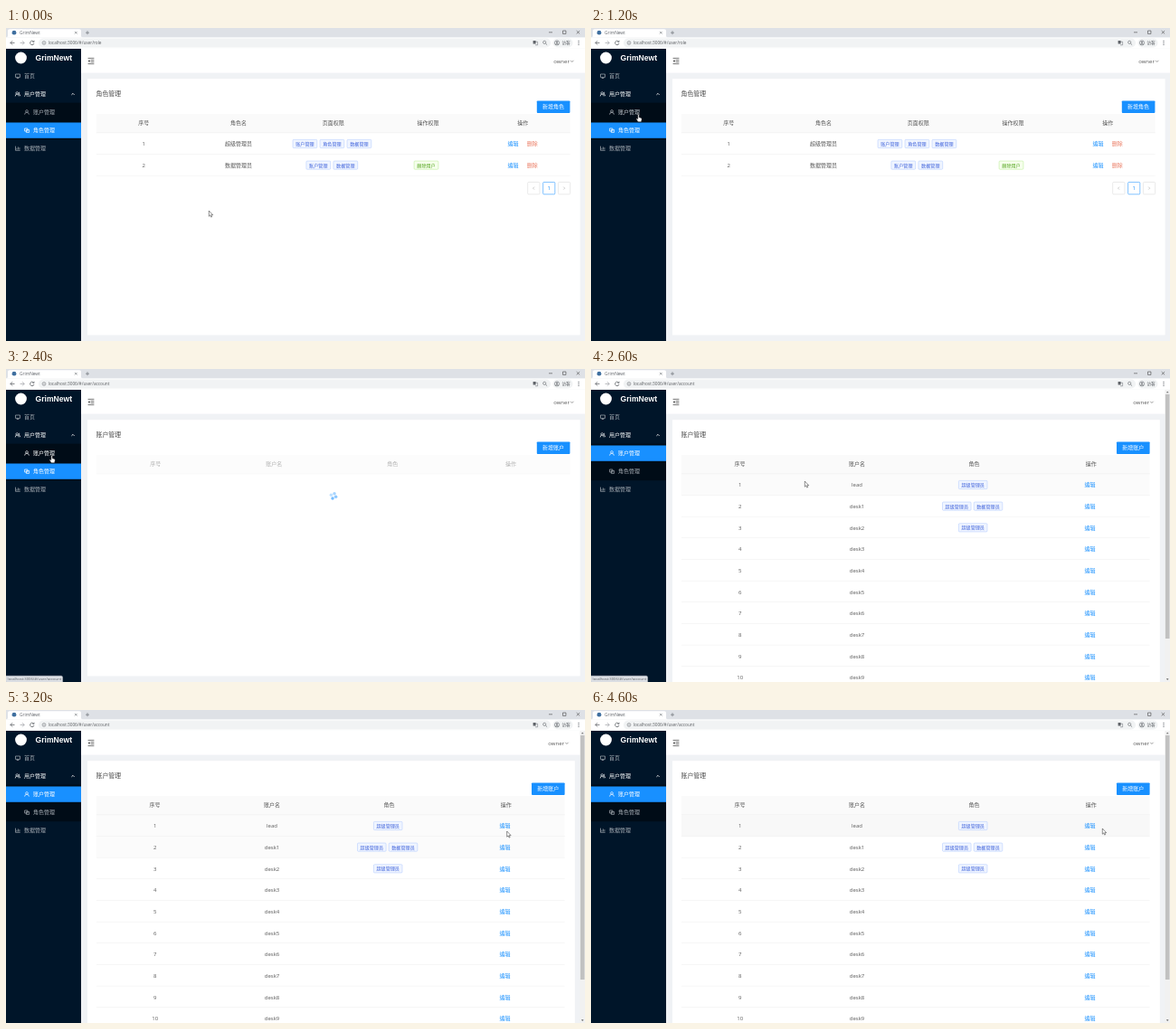
Animation, 640 px wide and 346 px high, one loop 5.6 s. Source, as an HTML page:

```html
<!DOCTYPE html>
<html lang="zh-CN">
<head>
<meta charset="utf-8">
<title>GrimNewt</title>
<style>
html, body { margin: 0; width: 100%; height: 100%; overflow: hidden; background: #fff; }
svg { display: block; width: 100vw; height: 100vh; }
text { font-family: "Open Sans", "Noto Sans CJK SC", "Noto Sans CJK", sans-serif; white-space: pre; }
.brand { font-family: "Liberation Sans", Arial, sans-serif; font-weight: 700; }
</style>
</head>
<body>
<svg id="stage" viewBox="0 0 640 346"></svg>
<script>
const LOOP = 5600, STEP = 100;
const BLUE = '#1890ff', INK = '#595959', DIM = '#a6adb4', CHROME = '#5f6368';
const ROW_TOP = 116, ROW_H = 23.66;

// Markup helpers
const rect = (x, y, w, h, fill, extra = '') =>
  `<rect x="${x}" y="${y}" width="${w}" height="${h}" fill="${fill}" ${extra}/>`;
const path = (d, color, width = 0.8, extra = '') =>
  `<path d="${d}" fill="none" stroke="${color}" stroke-width="${width}" ${extra}/>`;
const dot = (x, y, r, fill, extra = '') =>
  `<circle cx="${x}" cy="${y}" r="${r}" fill="${fill}" ${extra}/>`;
const label = (x, y, str, size = 6, fill = INK, extra = '') =>
  `<text x="${x}" y="${y + size * 0.37}" font-size="${size}" fill="${fill}" ${extra}>${str}</text>`;
const mid = (x, y, str, size, fill, extra = '') =>
  label(x, y, str, size, fill, `text-anchor="middle" ${extra}`);
const group = (id, body, extra = '') => `<g id="${id}" ${extra}>${body}</g>`;
const at = (x, y, body) => `<g transform="translate(${x} ${y})">${body}</g>`;

const rowY = i => 128 + i * ROW_H;

function browser() {
  return rect(0, 0, 640, 10.5, '#dee1e6') +
    '<path d="M0 10.5Q2 10.5 2 8.5V3Q2 1.2 4 1.2H81Q83 1.2 83 3V8.5Q83 10.5 85 10.5Z" fill="#fff"/>' +
    dot(9, 5.2, 2.4, '#3f6f9f') +
    label(15, 5.4, 'GrimNewt', 4.8, CHROME) +
    path('M76 3.9l2.6 2.6m0-2.6l-2.6 2.6', CHROME, 0.6) +
    path('M88 5.2h4m-2-2v4', CHROME, 0.6) +
    path('M600 4.8h4M615.5 3h3.4v3.4h-3.4zM630.7 3l3.4 3.4m0-3.4l-3.4 3.4', '#444', 0.6) +
    rect(0, 10.5, 640, 12.3, '#fff') +
    path('M9.5 16.4h-4.6m2.2-2.2l-2.2 2.2 2.2 2.2', CHROME, 0.8) +
    path('M15.6 16.4h4.6m-2.2-2.2l2.2 2.2-2.2 2.2', '#a5a8ac', 0.8) +
    path('M30.4 14.9a2.2 2.2 0 1 0 .6 2M31 13.8v1.6h-1.6', CHROME, 0.8) +
    rect(36, 11.6, 566, 9.8, '#f1f3f4', 'rx="4.9"') +
    dot(42, 16.4, 1.9, 'none', `stroke="${CHROME}" stroke-width=".5"`) +
    path('M42 16v1.5M42 15v.5', CHROME, 0.5) +
    '<text id="url" x="46.8" y="18.2" font-size="4.75" fill="#5a5d61"></text>' +
    rect(582.6, 14, 3, 3.6, CHROME, 'rx=".4"') +
    path('M585.2 15.2h2.4v3.6h-2.6M583.4 15.6h1.4', CHROME, 0.5) +
    dot(595.2, 15.8, 1.6, 'none', `stroke="${CHROME}" stroke-width=".6"`) +
    path('M596.4 17l1.7 1.7', CHROME, 0.7) +
    rect(604.5, 11.6, 22, 9.8, '#f1f3f4', 'rx="4.9"') +
    dot(609, 16.4, 2.6, 'none', `stroke="${CHROME}" stroke-width=".6"`) +
    dot(609, 15.7, 0.9, CHROME) + path('M607.4 18q1.6-1.4 3.2 0', CHROME, 0.7) +
    label(614.5, 16.4, '访客', 4.6, CHROME) +
    [14.4, 16.4, 18.4].map(y => dot(633, y, 0.55, CHROME)).join('');
}

const ICONS = {
  home: 'M-2.5-2h5v3.4h-5zM-1.3 2.5h2.6M0 1.4v1',
  team: 'M-.8-2.3a1.2 1.2 0 1 0 .01 0M-2.7 2.4q0-2.4 1.9-2.4t1.9 2.4M1-2.2a1.1 1.1 0 0 1 0 2.1q1.6.3 1.7 2.3',
  user: 'M0-2.4a1.3 1.3 0 1 0 .01 0M-2.4 2.6q.2-2.4 2.4-2.4t2.4 2.4',
  roles: 'M-2.4-2h3.2v3h-3.2zM-.6-.6h3.2v3h-3.2z',
  chart: 'M-2.5-2.4v4.7h5.2M-1.1 1.4v-1.7M.4 1.4v-3M1.9 1.4v-2.3'
};

function menuItem(id, x, y, icon, str, color = DIM, weight = 400) {
  return group(id, at(x, y, path(ICONS[icon], 'currentColor', 0.7)) +
    label(x + 7, y, str, 6, 'currentColor', `font-weight="${weight}"`), `color="${color}"`);
}

function sidebar() {
  return rect(0, 22.8, 83, 323.2, '#001529') +
    dot(16.5, 33, 6.4, '#fff') +
    label(32.6, 33.2, 'GrimNewt', 8.57, '#fff', 'class="brand"') +
    menuItem('home', 13, 53, 'home', '首页') +
    menuItem('users', 13, 73, 'team', '用户管理', '#fff', 500) +
    path('M72.4 73.9l1.6-1.6 1.6 1.6', '#fff', 0.8) +
    rect(0, 82.6, 83, 40.6, '#000c17') +
    `<rect id="picked" width="83" height="17.3" fill="${BLUE}"/>` +
    menuItem('account', 23, 93, 'user', '账户管理') +
    menuItem('role', 23, 113, 'roles', '角色管理') +
    menuItem('data', 13, 133, 'chart', '数据管理');
}

function header() {
  return rect(83, 22.8, 557, 26.8, '#fff') +
    path('M90.6 33.4h6.8M93.6 35.5h3.8M93.6 37.5h3.8M90.6 39.6h6.8', '#444', 0.75) +
    '<path d="M92.6 34.9v3.2l-2-1.6z" fill="#444"/>' +
    group('who', mid(614, 36.4, 'owner', 6, INK) + path('M624 35.8l1.7 1.7 1.7-1.7', INK, 0.6));
}

function tag(x, y, str, green) {
  const w = str.length > 4 ? 31.6 : 26.8;
  const [bg, edge, ink] = green ? ['#f6ffed', '#b7eb8f', '#52a41a'] : ['#f0f5ff', '#adc6ff', '#3f63dc'];
  return rect(x - w / 2, y - 4.6, w, 9.2, bg, `rx="1" stroke="${edge}" stroke-width=".5"`) +
    mid(x, y, str, 5.1, ink);
}

const title = str => label(99.6, 72, str, 6.86, '#4a4a4a');
const button = (x, str) => rect(x, 80.4, 36.6, 13.5, BLUE, 'rx=".9"') +
  mid(x + 18.3, 87.1, str, 6, '#fff', 'font-weight="500"');

function tableHead(width, names) {
  const col = width / names.length;
  return rect(99.8, 95, width, 21, '#fafafa') + rect(99.8, 115.7, width, 0.45, '#e8e8e8') +
    names.map((n, i) => mid(99.8 + col * (i + 0.5), 105.2, n, 6, '#555')).join('');
}

function rows(id, width, count) {
  let out = '';
  for (let i = 0; i < count; i++) {
    const y = ROW_TOP + i * ROW_H;
    out += rect(99.8, y, width, ROW_H, '#f8f8f8', `id="${id}${i}" opacity="0"`) +
      rect(99.8, y + ROW_H - 0.4, width, 0.45, '#ebebeb');
  }
  return out;
}

function pager() {
  const box = (x, edge) => rect(x, 170.4, 13.2, 13.4, '#fff', `rx="1" stroke="${edge}" stroke-width=".55"`);
  return box(576.7, '#d9d9d9') + box(593.6, BLUE) + box(610.4, '#d9d9d9') +
    path('M584 175.6l-1.5 1.5 1.5 1.5M616.2 175.6l1.5 1.5-1.5 1.5', '#aaa', 0.6) +
    mid(600.2, 177.1, '1', 6, BLUE);
}

function rolePage() {
  const names = ['超级管理员', '数据管理员'];
  let out = rect(90, 56.2, 544.6, 283.2, '#fff') + title('角色管理') + button(586.8, '新增角色') +
    tableHead(523.8, ['序号', '角色名', '页面权限', '操作权限', '操作']) + rows('r', 523.8, 2);
  names.forEach((n, i) => {
    const y = rowY(i);
    out += mid(152.2, y, i + 1) + mid(257, y, n) +
      mid(560.4, y, '编辑', 6, BLUE) + mid(581.8, y, '删除', 6, '#ea7a62');
  });
  ['账户管理', '角色管理', '数据管理'].forEach((n, i) => out += tag(330.4 + i * 30, rowY(0), n));
  ['账户管理', '数据管理'].forEach((n, i) => out += tag(345.3 + i * 30, rowY(1), n));
  return out + tag(464.5, rowY(1), '删除用户', true) + pager();
}

const ACCOUNT_COLS = ['序号', '账户名', '角色', '操作'];

function loadingPage() {
  const dots = [[-2.6, -1], [1, -2.6], [2.6, 1], [-1, 2.6]]
    .map(([x, y], i) => dot(x, y, 1.75, BLUE, `opacity="${0.4 + i * 0.15}"`)).join('');
  return rect(90, 56.2, 544.6, 283.2, '#fff') + title('账户管理') + button(586.8, '新增账户') +
    group('fadedHead', tableHead(523.8, ACCOUNT_COLS)) + group('spinner', dots);
}

function accountPage() {
  let out = rect(90, 56.2, 538.8, 290, '#fff') + title('账户管理') + button(581, '新增账户') +
    tableHead(517.8, ACCOUNT_COLS) + rows('a', 517.8, 10);
  for (let i = 0; i < 10; i++) {
    const y = rowY(i);
    out += mid(164.7, y, i + 1) + mid(294, y, i ? 'desk' + i : 'lead') + mid(551.4, y, '编辑', 6, BLUE);
  }
  return out + tag(422.2, rowY(0), '超级管理员') + tag(404.3, rowY(1), '超级管理员') +
    tag(439, rowY(1), '数据管理员') + tag(422.2, rowY(2), '超级管理员') +
    rect(634.4, 22.8, 5.6, 323.2, '#f1f1f1') + rect(634.9, 28, 4.6, 270, '#c1c1c1') +
    '<path d="M635.8 26.3l1.4-1.6 1.4 1.6zM635.8 342.3l1.4 1.6 1.4-1.6z" fill="#666"/>';
}

const ARROW = '<path d="M0 0V6.2L1.4 4.9 2.4 7.1 3.4 6.6 2.5 4.6H4.4Z" fill="#fff" stroke="#222" stroke-width=".5"/>';
const HAND = '<path d="M-.7.6Q0-.5.7.6V3.4L3 4Q3.9 4.4 3.6 5.8L3 8.4H-.5L-2.4 5.3Q-2.2 4.2-.7 5.2Z" ' +
  'fill="#fff" stroke="#111" stroke-width=".45"/>';

document.getElementById('stage').innerHTML =
  rect(0, 0, 640, 346, '#f0f2f5') + header() +
  group('rolePage', rolePage()) + group('loadingPage', loadingPage()) + group('accountPage', accountPage()) +
  sidebar() + browser() +
  group('status', '<path d="M0 339.2H61Q62.6 339.2 62.6 340.8V346H0Z" fill="#dee1e6" stroke="#c3c6ca" stroke-width=".4"/>' +
    label(1.6, 342.7, 'localhost:3006/#/user/account', 4.2, CHROME)) +
  group('arrow', ARROW) + group('hand', HAND);

const el = id => document.getElementById(id);
const set = (id, name, value) => el(id).setAttribute(name, value);
const show = (id, on) => set(id, 'visibility', on ? 'visible' : 'hidden');

// Pointer waypoints: time, x, y
const TRAIL = [
  [0, 224.3, 202], [100, 221, 196], [200, 204, 176], [300, 170, 151], [400, 130, 130],
  [500, 98, 113], [600, 76, 104], [800, 60, 98], [1200, 52.5, 95.4], [1700, 50.6, 95.4],
  [2400, 50.6, 95.4], [2500, 130, 108], [2600, 236.3, 124], [2800, 410, 146], [2900, 470, 152],
  [3000, 515, 151], [3100, 543, 144], [3200, 553.7, 134], [4600, 565.3, 131]
];

function pointer(t) {
  const i = TRAIL.findIndex(p => p[0] > t);
  if (i < 0) return TRAIL[TRAIL.length - 1].slice(1);
  if (i === 0) return TRAIL[0].slice(1);
  const [t0, x0, y0] = TRAIL[i - 1], [t1, x1, y1] = TRAIL[i];
  const k = (t - t0) / (t1 - t0);
  return [x0 + (x1 - x0) * k, y0 + (y1 - y0) * k];
}

const hoveredRow = ([x, y]) => x < 100 || x > 618 ? -1 : Math.floor((y - ROW_TOP) / ROW_H);

function draw(t) {
  const leaving = t >= 2300, loaded = t >= 2500;
  show('rolePage', !leaving);
  show('loadingPage', leaving && !loaded);
  show('accountPage', loaded);
  set('fadedHead', 'opacity', t < 2400 ? 0.25 : 0.45);
  set('spinner', 'opacity', t < 2400 ? 0.4 : 0.7);
  set('spinner', 'transform', `translate(362 140.3) rotate(${(t - 2400) * 0.3})`);
  set('who', 'transform', `translate(${loaded ? -5.8 : 0} 0)`);
  el('url').textContent = 'localhost:3006/#/user/' + (leaving ? 'account' : 'role');

  set('picked', 'y', loaded ? 84.5 : 104.5);
  set('account', 'color', t >= 1300 ? '#fff' : t >= 1200 ? '#c4c9ce' : DIM);
  set('role', 'color', loaded ? DIM : '#fff');
  show('status', t >= 1500 && t < 3000);

  const now = pointer(t), before = pointer(Math.max(0, t - STEP));
  const hand = now[0] < 83;
  show('hand', hand);
  show('arrow', !hand);
  set(hand ? 'hand' : 'arrow', 'transform', `translate(${now})`);

  // Row highlight fades over two steps
  const fade = i => ((hoveredRow(now) === i) + (hoveredRow(before) === i)) / 2;
  for (let i = 0; i < 2; i++) set('r' + i, 'opacity', fade(i));
  for (let i = 0; i < 10; i++) set('a' + i, 'opacity', fade(i));
}

let last = -1;
function tick() {
  const t = Math.floor(performance.now() % LOOP / STEP) * STEP;
  if (t !== last) draw(last = t);
  requestAnimationFrame(tick);
}
tick();
</script>
</body>
</html>
```
